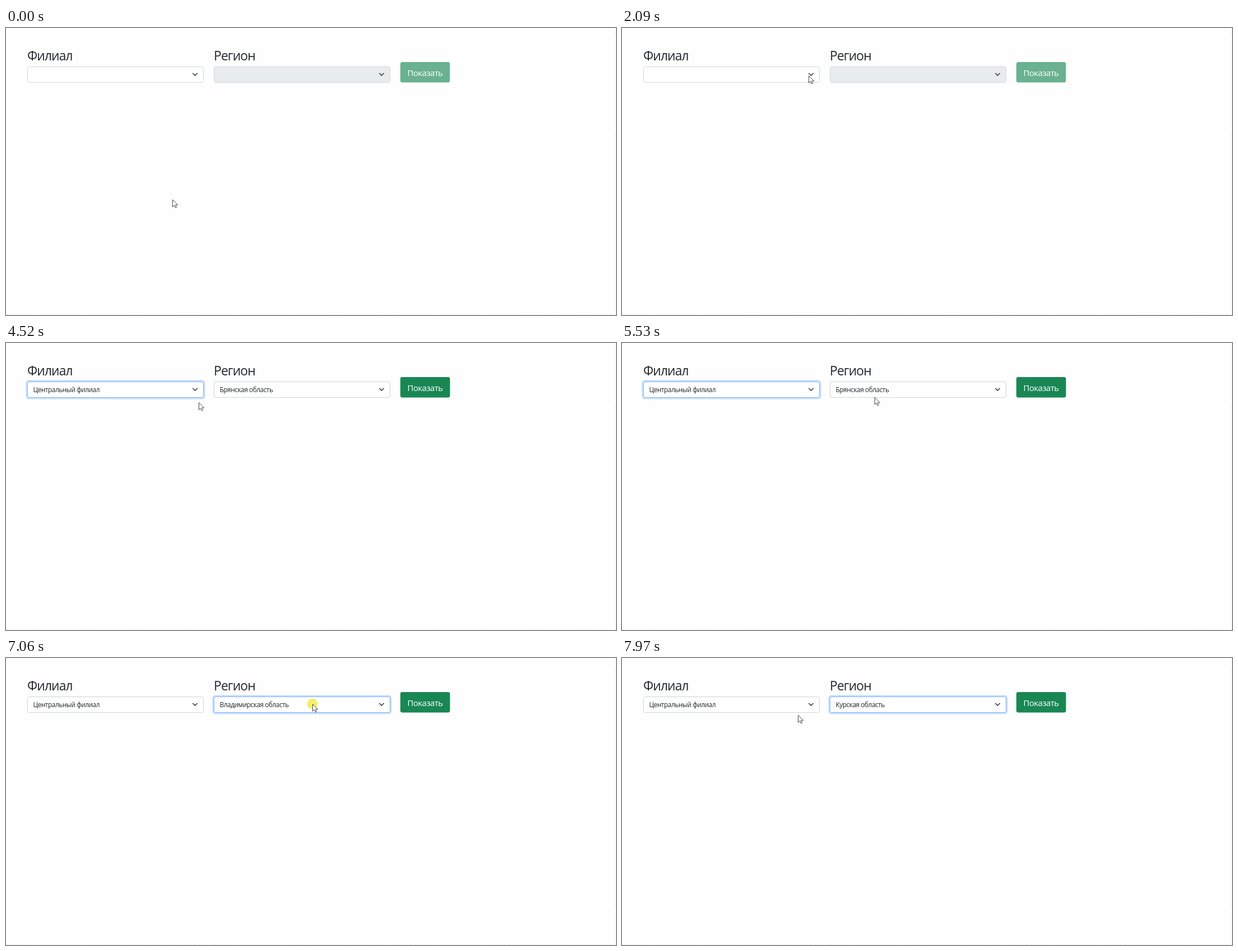
Write an HTML page that moves like this. It is 1089 px wide and 514 px high and loops after 7.99 s.

```html
<!DOCTYPE html>
<html lang="ru">
<head>
<meta charset="utf-8">
<title>Выбор региона</title>
<style>
html, body { margin: 0; width: 100%; height: 100%; overflow: hidden; background: #fefefe; }
svg { display: block; }
text { font-family: "Open Sans", "Noto Sans", sans-serif; font-size: 11.8px; letter-spacing: -.037em; fill: #212529; }
.title { font-size: 22.8px; }
.label { font-size: 15px; fill: #fff; }
.box { fill: #fff; stroke: #ced4da; }
.off { fill: #e9ecef; }
.ring { fill: #fff; stroke: #86b7fe; }
.halo { fill: none; stroke: #c2dbfe; stroke-width: 3; }
.chevron { fill: none; stroke: #343a40; stroke-width: 1.5; stroke-linecap: round; stroke-linejoin: round; }
.shade { fill: #8d8d8d; }
.panel { fill: #fff; stroke: #cdcdd0; }
.hover { fill: #e0e0e6; }
.edge { stroke: #ececec; stroke-dasharray: 4 3; }
.mark { fill: #f2ee5c; fill-opacity: .92; }
.pointer { fill: #fff; stroke: #30303c; stroke-width: .9; stroke-linejoin: round; }
</style>
</head>
<body>
<svg id="stage" width="1089" height="514" viewBox="0 0 1089 514"></svg>
<script>
const LOOP = 7990;
const stage = document.getElementById('stage');

function add(tag, attrs, parent = stage, content = '') {
  const el = document.createElementNS('http://www.w3.org/2000/svg', tag);
  for (const key in attrs) el.setAttribute(key, attrs[key]);
  el.textContent = content;
  parent.append(el);
  return el;
}

const write = (x, y, content, cls = '', parent = stage) =>
  add('text', { x, y, class: cls }, parent, content);

function play(el, frames) {
  el.animate(frames, { duration: LOOP, iterations: Infinity });
}

// Visible only inside the given [from, to] spans, with hard switches.
function show(el, ...spans) {
  const frames = [{ offset: 0, opacity: 0, easing: 'step-end' }];
  for (const [from, to] of spans) {
    frames.push({ offset: from / LOOP, opacity: 1, easing: 'step-end' });
    frames.push({ offset: to / LOOP, opacity: 0, easing: 'step-end' });
  }
  if (frames.at(-1).offset < 1) frames.push({ offset: 1, opacity: 0 });
  play(el, frames);
}

function field(x, title, values, focus, enabled) {
  const rect = { x: x + .5, y: 69.5, width: 314, height: 28, rx: 3 };
  write(x, 58, title, 'title');
  add('rect', { ...rect, class: enabled ? 'box off' : 'box' });
  if (enabled) show(add('rect', { ...rect, class: 'box' }), enabled);
  const ring = add('g', {});
  add('rect', { x: x - 1, y: 68, width: 317, height: 31, rx: 4, class: 'halo' }, ring);
  add('rect', { ...rect, class: 'ring' }, ring);
  show(ring, focus);
  for (const [content, from, to] of values)
    show(write(x + 10.5, 88.3, content), [from, to]);
  add('path', { d: `M${x + 295.7} 81.3l3.8 3.8 3.8-3.8`, class: 'chevron' });
}

function list(x, options, open, hovers) {
  const height = options.length * 24.4 + 7;
  const g = add('g', {});
  add('rect', { x: x + 3, y: 100, width: 313, height: height - .5, rx: 2, class: 'shade' }, g);
  add('rect', { x: x + .5, y: 97.5, width: 314, height, rx: 2, class: 'panel' }, g);
  show(g, ...open);
  for (const [row, from, to] of hovers)
    show(add('rect', { x: x + 1, y: 100.6 + row * 24.4, width: 313, height: 24.4, class: 'hover' }), [from, to]);
  options.forEach((name, i) => show(write(x + 5, 118.2 + i * 24.4, name), ...open));
}

function click(cx, cy, from, to) {
  show(add('circle', { cx, cy, r: 9.5, class: 'mark' }), [from, to]);
}

add('path', { d: 'M1088.5 0V514M0 513.5H1089', class: 'edge' });

const central = 'Центральный филиал';
const regions = ['Брянская', 'Владимирская', 'Калужская', 'Курская'].map(name => name + ' область');

field(38, 'Филиал', [['Выберите филиал', 0, 3920], [central, 3920, LOOP]], [2990, 5980]);
field(371, 'Регион',
  [[regions[0], 3950, 6540], [regions[1], 6540, 7650], [regions[3], 7650, LOOP]],
  [5980, LOOP], [3950, LOOP]);

const button = { x: 704, y: 61, width: 88.5, height: 36.5, rx: 3.5 };
add('rect', { ...button, fill: '#69b190' });
show(add('rect', { ...button, fill: '#198754' }), [3950, LOOP]);
write(716.5, 85.5, 'Показать', 'label');

list(38, [central, 'Кавказский филиал'], [[3050, 3920]], [[0, 3470, 3920]]);
list(371, regions, [[6030, 6540], [7110, 7650]],
  [[0, 6030, 6330], [1, 6330, 6540], [1, 7110, 7400], [2, 7400, 7480], [3, 7480, 7650]]);

click(334, 85, 2980, 3080);
click(289, 116, 3840, 3940);
click(588, 85, 5950, 6050);
click(554, 143, 6450, 6530);
click(547, 82, 7050, 7130);
click(500, 176, 7590, 7660);

const pointer = add('path', {
  d: 'M.5 .6V13.4L3.5 10.6 5.5 15 7.5 14.1 5.6 9.9H9.7Z',
  class: 'pointer'
});

// Each sweep: start time, end time, then evenly timed stops as "x,y".
const sweeps = [
  [500, 1240, '297,307 237,250 193,178 228,110 319,72'],
  [1280, 1460, '335,71 342,79'],
  [1600, 1780, '341,83 336,83'],
  [1940, 2090, '335,84 333,85'],
  [3330, 3480, '333,85 314,97 289,116'],
  [4330, 5110, '289,116 345,106 445,85 520,75 533,78'],
  [5130, 5530, '532,79 470,92 409,97 450,97'],
  [5530, 5900, '450,97 540,85 597,76 589,83'],
  [6080, 6420, '588,85 574,108 553,143'],
  [6580, 7030, '553,143 554,98 547,82'],
  [7140, 7370, '547,82 505,165'],
  [7370, 7490, '505,165 500,176'],
  [7810, 7970, '500,176 422,140 314,102']
];

const place = (time, spot) => {
  const [x, y] = spot.split(',');
  return { offset: time / LOOP, transform: `translate(${x}px, ${y}px)` };
};
const route = sweeps.flatMap(([from, to, stops]) => {
  const spots = stops.split(' ');
  return spots.map((spot, i) => place(from + (to - from) * i / (spots.length - 1), spot));
});
play(pointer, [{ ...route[0], offset: 0 }, ...route, { ...route.at(-1), offset: 1 }]);
</script>
</body>
</html>
```
